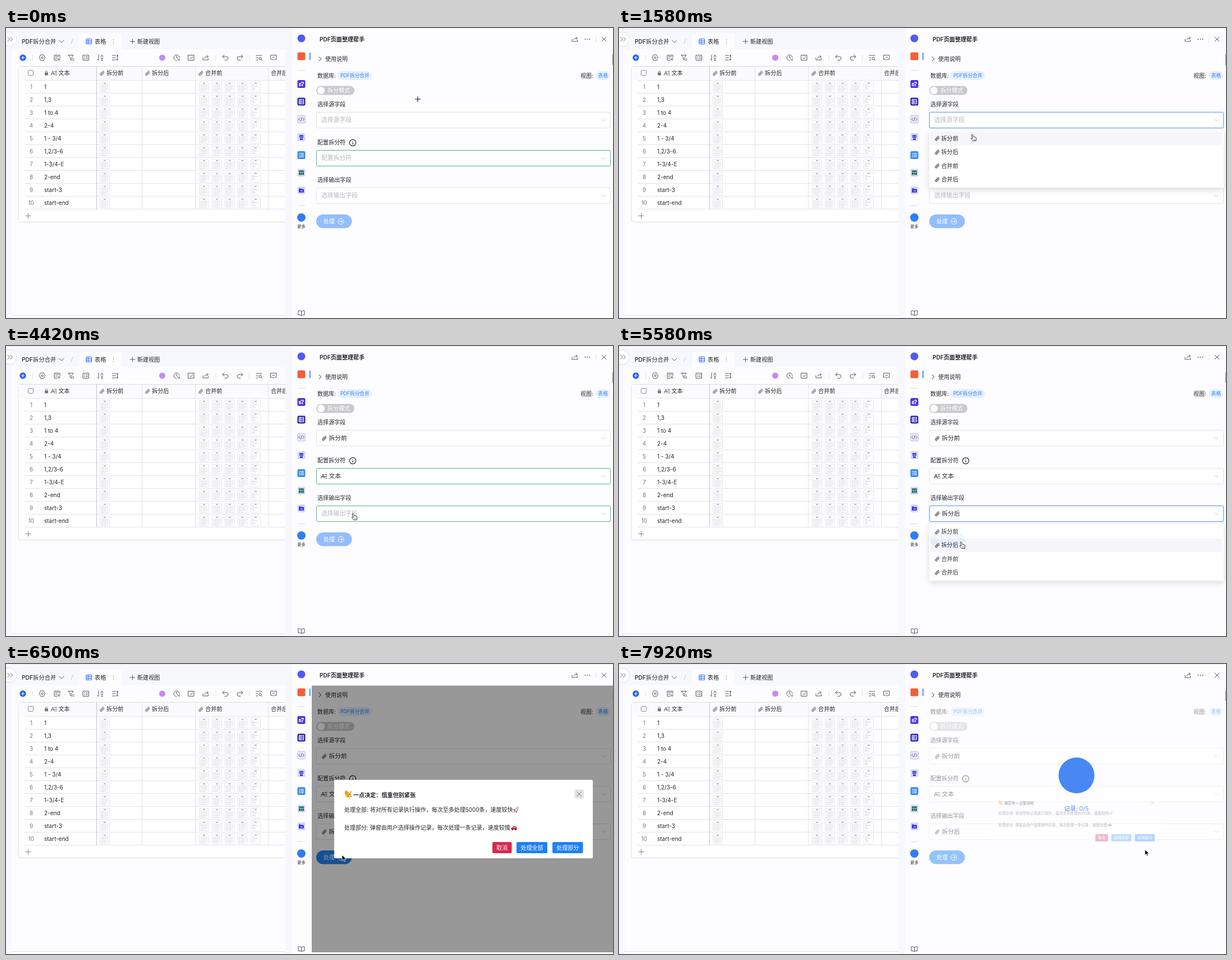
These frames come from a looping animation (1082x518 px, 8 s). An HTML page:

```html
<!DOCTYPE html>
<html lang="zh-CN">
<head>
<meta charset="utf-8">
<style>
html, body { margin: 0; width: 100%; height: 100%; overflow: hidden; background: #f7f8fe }
svg { display: block; width: 1082px; height: 518px; font-family: Inter, "Noto Sans CJK SC", sans-serif }
text { white-space: pre }
.pop { filter: drop-shadow(0 4px 6px #00000024) }
</style>
</head>
<body>
<svg viewBox="0 0 1082 518">
  <defs>
    <g id="doc">
      <rect x=".5" y=".5" width="17" height="17.5" rx="1" fill="#fff" stroke="#dcdde6" stroke-width=".8"/>
      <path d="M7 3h4" stroke="#777" stroke-width="1"/>
    </g>
    <g id="full">
      <use href="#doc"/>
      <path d="M2.5 6h13M2.5 8.5h13M2.5 11h13M2.5 13.5h13M2.5 16h9" stroke="#c4c4d4" stroke-width=".8" stroke-dasharray="3 .7 2 .5"/>
    </g>
    <g id="sparse">
      <use href="#doc"/>
      <path d="M2.5 6h4M2.5 8.5h10M2.5 11h4M2.5 13.5h6" stroke="#c4c4d4" stroke-width=".8"/>
    </g>
  </defs>
  <g id="still"></g>
  <g id="live"></g>
</svg>
<script>
const INK = '#25262c', GREY = '#55565e', BLUE = '#3370ff', PALE = '#d5d9fb', PAGE = '#fdfdff';
const $ = id => document.getElementById(id);
const clamp = v => Math.max(0, Math.min(1, v));

const text = (x, y, size, str, fill = INK, attrs = '') =>
  `<text x="${x}" y="${y + size * .37}" font-size="${size}" fill="${fill}" ${attrs}>${str}</text>`;
const rect = (x, y, w, h, fill, attrs = '') =>
  `<rect x="${x}" y="${y}" width="${w}" height="${h}" fill="${fill}" ${attrs}/>`;
const circle = (x, y, r, fill, attrs = '') => `<circle cx="${x}" cy="${y}" r="${r}" fill="${fill}" ${attrs}/>`;
const line = (d, stroke = GREY, w = 1, fill = 'none') =>
  `<path d="${d}" fill="${fill}" stroke="${stroke}" stroke-width="${w}" stroke-linecap="round" stroke-linejoin="round"/>`;
const at = (x, y, body) => `<g transform="translate(${x} ${y})">${body}</g>`;
const BOLD = 'font-weight="600"', MID = 'font-weight="500"', CENTER = 'text-anchor="middle"';

const clip = (x, y, c = GREY) => at(x, y,
  line('M4 -.5L0 3.8C-1.8 5.6 -4.6 3.2 -3 1.3L1 -3C2.3 -4.4 4.2 -2.6 3 -1.3L-.8 2.6C-1.5 3.2 -2.3 2.4 -1.7 1.7L1.6 -1.8', c, .9));
const letterIcon = (x, y, c = GREY) => at(x, y, line('M-5 3.5L-2 -3.5L.8 3.5M-4 1.2H0M1 -3.2H5M1.6 0H5M2.5 3.3H5', c, 1));
const plus = (x, y, r, c, w = 1) => line(`M${x - r} ${y}h${2 * r}M${x} ${y - r}v${2 * r}`, c, w);
const cross = (x, y, r, c) => line(`M${x - r} ${y - r}l${2 * r} ${2 * r}m0 ${-2 * r}l${-2 * r} ${2 * r}`, c);
const SHARE = 'M-5 0V4H4.5V1.5M-2 1Q-1.5 -2 4 -2M2 -4.5L4.5 -2L2 .5';

function toolbar() {
  const icons = [
    [64.5, 'M-2.5 -5H2.5L5 0L2.5 5H-2.5L-5 0ZM-1.7 0a1.7 1.7 0 1 0 3.4 0a1.7 1.7 0 1 0 -3.4 0'],
    [91, 'M5 0V-4.5H-5V4.5H0M-3 -2H3M-3 1H0M1.7 3a1.6 1.6 0 1 0 3.2 0a1.6 1.6 0 1 0 -3.2 0'],
    [116, 'M-5 -4.5H4L1 -.5V4.5L-1.5 3V-.5ZM3 2H5M3 4.5H5'],
    [142.5, 'M-5 -4.5H5V4.5H-5ZM-3 -1.5H-2M0 -1.5H3M-3 1.5H-2M0 1.5H3'],
    [168, 'M-3 -5V5L-5 3M1 -1L3 -5L5 -1M1.5 1H4.5L1.5 5H4.5'],
    [194.5, 'M-5 -4H1M-5 0H1M-5 4H1M4 -4.5V4.5M2.5 -3L4 -4.5L5.5 -3M2.5 3L4 4.5L5.5 3'],
    [304, 'M5 0A5 5 0 1 0 0 5M0 -3V0L2 1.5M2 3L5 5L5 2'],
    [330, 'M-5 -4.5H5V4.5H-5ZM-2.5 0L-.5 2L3 -2'],
    [356, SHARE],
    [391, 'M-2 -5L-5 -2L-2 1M-5 -2H2Q5 -2 5 1T2 4.5H-1'],
    [417, 'M2 -5L5 -2L2 1M5 -2H-2Q-5 -2 -5 1T-2 4.5H1'],
    [451, 'M-5 -4H5M-5 0H-2M-5 4H-2M0 1.5a2.2 2.2 0 1 0 4.4 0a2.2 2.2 0 1 0 -4.4 0M4 3.5L5.5 5'],
    [477, 'M-5 -4.5H5V3H1.5L0 4.5L-1.5 3H-5ZM-2 -.8H2']
  ];
  return circle(30, 53, 5.7, '#2463eb') + plus(30, 53, 2.6, '#fff', 1.2) + circle(278.5, 53, 5.5, '#c58af0') +
    [47.5, 374, 434].map(x => line(`M${x} 48v10`, '#dfe0e8')).join('') +
    icons.map(([x, d]) => at(x, 53, line(d))).join('');
}

function table() {
  const rows = ['1', '1,3', '1 to 4', '2-4', '1 - 3/4', '1,2/3-6', '1-3/4-E', '2-end', 'start-3', 'start-end'];
  const head = [[171, '拆分前'], [252, '拆分后'], [347, '合并前']];
  let s = `<path d="M510 68.5H26a4 4 0 0 0 -4 4V342.5a4 4 0 0 0 4 4H510" fill="#fff" stroke="#dadbe4"/>` +
    rect(22.5, 69, 476, 24, '#fbfbfe') + rect(39.5, 75.5, 9, 9, 'none', 'stroke="#888992" rx="1"') +
    rect(69, 79.5, 6, 5, '#777', 'rx="1"') + line('M70.3 79.5v-1a1.7 1.7 0 0 1 3.4 0v1', '#777') +
    letterIcon(85.5, 80.5) + text(93.5, 80.5, 10.1, '文本') + text(472, 80.5, 10, '合并后');
  for (const [x, name] of head) s += clip(x, 80.5) + text(x + 8, 80.5, 10.2, name);
  for (let i = 0; i <= 10; i++) s += line(`M34 ${93.5 + 23 * i}H498`, '#e1e2ea');
  for (const x of [161.5, 242.5, 337.5, 467.5]) s += line(`M${x} 69V323`, x < 200 ? '#c2c3cc' : '#e1e2ea');
  rows.forEach((name, i) => {
    const y = 105 + 23 * i;
    s += text(45, y, 10, i + 1, '#777881', CENTER) + text(68, y, 10, name);
    [167, 344, 367, 389.5, 412.5, 436].forEach((x, k) =>
      s += `<use href="#${k == 5 ? 'sparse' : 'full'}" x="${x}" y="${y - 9}"/>`);
  });
  return s + plus(39.5, 335.5, 4.5, '#85868f');
}

function sidebar() {
  const tile = (y, fill, glyph = '', attrs = '') => at(526.5, y, rect(-7, -7, 14, 14, fill, 'rx="2.5" ' + attrs) + glyph);
  const grid = c => rect(-4, -4, 8, 8, 'none', `stroke="${c}"`) + line('M-4 -1.3H4M-4 1.4H4M-1.3 -4V4', c);
  return circle(526.5, 18.5, 7, '#4e5cf2') + tile(50.5, '#f2603a') + rect(541, 44, 1.6, 13, BLUE) +
    line('M520 75.5h13M520 317.5h13', '#d8d9e2') +
    tile(100, '#4a2fe6', line('M-3.5 3.5V-1H-1M-1 3.5V1M2 3.5V0M0 -3H3.5V-1', '#fff', 1.5)) +
    tile(131.5, '#2b23b5', grid('#fff')) +
    tile(163, '#e6e7fa', line('M-2.5 -2.5L-5 0L-2.5 2.5M2.5 -2.5L5 0L2.5 2.5M1 -3L-1 3', '#5d6090'), 'stroke="#b4b6dd" stroke-width=".8"') +
    tile(195, PALE, rect(-3.5, -4, 7, 5, '#4038e0', 'rx="1"') + rect(-2.5, 2, 5, 3, '#4038e0') + circle(-1.5, -1.5, .8, '#fff') + circle(1.5, -1.5, .8, '#fff')) +
    tile(227, '#368bf4', line('M-4 -3H4M-4 0H-1M-4 3H4', '#fff', 1.2) + circle(2, 0, 1.7, '#368bf4', 'stroke="#fff"')) +
    tile(258.5, PALE, rect(-4.5, -4, 9, 8, '#14685a') + line('M-4 -1H4M-1.5 -1V4M1.5 -1V4', '#cfe5e5', .8)) +
    tile(290, PALE, line('M-4 3V-3H-1L0 -2H4V3Z', '#4038e0', 1, '#4038e0') + line('M-1 1H2', '#fff')) +
    circle(526.5, 338.5, 7.5, '#2f7df6') + text(526.5, 354, 7.3, '更多', INK, CENTER) +
    at(526.5, 509, line('M0 -3Q-2 -4.5 -5.5 -4V3.5Q-2 3 0 4.5Q2 3 5.5 3.5V-4Q2 -4.5 0 -3V4.5'));
}

function still() {
  return rect(10, 38, 488, 480, PAGE) +
    `<path d="M126 38Q131 38 131 33V14Q131 10 135 10H202Q206 10 206 14V33Q206 38 211 38" fill="${PAGE}"/>` +
    circle(6, 20, 13, '#fff', 'stroke="#dcdde6"') + line('M3 16.5l3.5 3.5l-3.5 3.5M8 16.5l3.5 3.5l-3.5 3.5', '#62636c') +
    text(28, 24, 10.3, 'PDF拆分合并', INK, MID) + line('M94.5 22l4.3 4.3l4.3 -4.3', GREY) + line('M116 28l3 -8', '#c4c5ce') +
    rect(143, 19.5, 9.5, 9, 'none', `stroke="${BLUE}" stroke-width="1.2" rx="1"`) + line('M143 22.5h9.5M143 25.5h9.5M146.5 20v8', BLUE) +
    text(158, 24, 10.2, '表格', INK, MID) + [20.5, 24, 27.5].map(y => circle(191.5, y, .7, '#888')).join('') +
    plus(225.5, 24, 4.3, GREY) + text(234, 24, 10.1, '新建视图') + toolbar() + table() +
    line('M10 513.5H498', '#dfe0ea') +
    rect(498, 0, 12, 518, '#f7f8fe') + rect(510, 0, 572, 518, PAGE) + rect(0, 0, 1082, 1, '#ececf5') + sidebar() +
    text(559, 20, 10.1, 'PDF页面整理帮手', INK, BOLD) + at(1014, 20, line(SHARE)) +
    [1032.5, 1036.5, 1040.5].map(x => circle(x, 20, .9, GREY)).join('') +
    line('M1052 15v10', '#dfe0e8') + cross(1066, 20, 4, GREY);
}

const FIELDS = [
  { y: 150.5, label: '选择源字段', value: '拆分前', set: 2060, open: 960, focus: [900, 2900], hover: [[300, 900]] },
  { y: 218.5, label: '配置拆分符', value: '文本', set: 3720, open: 2960, focus: [2900, 4240], hover: [[0, 50], [2600, 2900], [4240, 4560]] },
  { y: 285.5, label: '选择输出字段', value: '拆分后', set: 5570, open: 4600, focus: [4560, 6240], hover: [[4200, 4560]] }
];
const ATTACH = ['拆分前', '拆分后', '合并前', '合并后'];
const within = (t, [a, b]) => t >= a && t < b;

function field(f, i, t) {
  const focused = within(t, f.focus), hovered = f.hover.some(r => within(t, r));
  const edge = focused ? '#6a9df8' : hovered ? '#54b283' : '#e1e2ea';
  const y = f.y + 14, done = t >= f.set;
  let s = text(555, f.y - 14, 10.1, f.label) +
    (focused ? rect(553.5, f.y, 524, 28, 'none', 'rx="2" stroke="#dbe7fd" stroke-width="2.6"') : '') +
    rect(553.5, f.y, 524, 28, '#fff', `rx="2" stroke="${edge}"`) +
    line(`M1061.5 ${y - 1.5}l3.5 3.5l3.5 -3.5`, '#c6c7d0');
  if (done) s += (i == 1 ? letterIcon : clip)(567, y, INK) + text(575.5, y, 10.7, f.value);
  else s += text(562, y, 10.8, f.label, '#b7b8c0') + (i == 1 && focused && t < 3400 ? line(`M562 ${y - 6}v12`, '#6b8fd8') : '');
  return s;
}

function menu(f, i, t, my) {
  const show = Math.min(clamp((t - f.open) / 200), clamp(1 - (t - f.set) / 200));
  if (!show) return '';
  const items = i == 1 ? ['文本'] : ATTACH, top = f.y + 32;
  let s = rect(553, top, 525, items.length * 24.5 + 5, '#fff', 'rx="2" class="pop"');
  items.forEach((name, k) => {
    const y = top + 14.3 + k * 24.5;
    if (Math.abs(my - y) < 12.2) s += rect(555, y - 12, 520, 24.5, '#f5f5fb');
    s += (i == 1 ? letterIcon : clip)(567, y, INK) + text(574.5, y, 10.1, name);
  });
  return `<g opacity="${show}" transform="translate(0 ${top * (1 - show) * .2}) scale(1 ${.8 + .2 * show})">${s}</g>`;
}

function form(t, my) {
  const ready = t >= FIELDS[2].set;
  return line('M558 51.5l3.7 3.7l-3.7 3.7', INK) + text(569, 55.5, 10, '使用说明') +
    text(555, 85, 10, '数据库:') + rect(591, 77, 61, 16, '#e6f0ff', 'rx="8"') + text(596, 85, 8.7, 'PDF拆分合并', '#3580f5') +
    text(1024, 85, 10, '视图:') + rect(1051, 77, 26, 16, '#e6f0ff', 'rx="8"') + text(1055.5, 85, 8.7, '表格', '#3580f5') +
    rect(553, 103.5, 68, 16, '#c8c9cd', 'rx="8"') + circle(561.5, 111.5, 6.6, '#fff') + text(573, 111.5, 10.1, '拆分模式', '#fff') +
    FIELDS.map((f, i) => field(f, i, t)).join('') +
    circle(618, 205, 5.6, 'none', `stroke="${INK}" stroke-width="1.2"`) + line('M618 204.5v3M618 202.3v.1', INK, 1.2) +
    rect(553, 333, 63.5, 24.5, ready ? '#2185f8' : '#94bdfb', 'rx="12.25"') + text(566, 345.5, 10, '处理', '#fff', MID) +
    circle(597, 345.5, 5, 'none', 'stroke="#fff"') + line('M594.5 345.5h5M597.5 343.5l2 2l-2 2', '#fff') +
    FIELDS.map((f, i) => menu(f, i, t, my)).join('');
}

const party = at(609.5, 232.5, circle(.5, 1, 5.5, '#fbc43c') + line('M-5.5 -1L-4 -6.5L0 -3.5Z', '#d9822b', .8, '#ef9a3a') +
  line('M-2 0h1.5M2 0h1.5M-1 3q1.5 1.5 3 0', '#6b4214') + circle(5.5, -4, .9, '#e0455c') + circle(5.5, 4, .9, '#4a8be0'));
const rocket = at(909.5, 260, line('M-3 3Q-3 -3 4 -4.5Q3.5 2 -1.5 4Z', '#7d8190', .8, '#d5d8e2') +
  line('M-4.5 4.5l2 -2', '#ef7d2b', 1.5) + line('M-3 0L-5 1M1 3.5L0 5', '#d3323f', 1.5));
const car = at(905.5, 293, line('M-5 2V0L-2.5 -.5L-1 -3H3L5 0V2Z', '#cf2f3b', .8, '#e0404a') +
  line('M0 -1.5h2.5', '#cfe3f5') + circle(-2.5, 2.5, 1.4, '#333') + circle(3, 2.5, 1.4, '#333'));

function dialog(show, closing, mx) {
  const button = (x, w, name, fill) => rect(x, 318, w, 20, fill, 'rx="2"') + text(x + w / 2, 328, 10, name, '#fff', `${CENTER} ${MID}`);
  const k = .5 + .5 * show;
  return `<g opacity="${show}" transform="translate(815.5 277) scale(${k}) translate(-815.5 -277)">` +
    rect(585, 207, 461, 140, '#fff', 'rx="2"') + party +
    text(619, 234, 10.1, closing ? '确实有一点繁琐呢' : '一点决定：慎重但别紧张', INK, BOLD) +
    (show == 1 ? rect(1013.5, 224, 16.5, 16.5, '#e4e4e6', 'rx="2"') : '') + cross(1021.7, 232.3, 4, '#666') +
    text(603, 260.5, 10, '处理全部: 将对所有记录执行操作，每次至多处理5000条，速度较快') + rocket +
    text(603, 292.5, 10, '处理部分: 弹窗由用户选择操作记录，每次处理一条记录，速度较慢') + car +
    button(867, 34.5, '取消', '#d52950') + button(910, 55, '处理全部', mx > 915 ? '#469cf9' : '#1f80f3') +
    button(974, 54.5, '处理部分', '#1f80f3') + '</g>';
}

// Pointer stops: time, x, y
const PATH = [[0, 734, 127], [80, 734, 127], [750, 640, 166], [1000, 640, 166], [1450, 632, 196], [2080, 632, 196],
  [2700, 638, 232], [3100, 638, 232], [3500, 626, 264], [3750, 626, 264], [4300, 621, 305], [4660, 621, 305],
  [5250, 612, 356], [5600, 612, 356], [6080, 592, 347], [6420, 592, 347], [7330, 938, 337], [8000, 938, 337]];

function pointerAt(t) {
  const i = PATH.findIndex(p => p[0] > t), [a, b] = [PATH[i - 1], PATH[i]];
  const p = (t - a[0]) / (b[0] - a[0]), e = p * p * (3 - 2 * p);
  return [a[1] + (b[1] - a[1]) * e, a[2] + (b[2] - a[2]) * e];
}

function pointer(x, y, t) {
  if (t < 330) return plus(x, y, 4.5, '#fff', 3) + plus(x, y, 4.5, '#111', 1.1);
  const arrow = t >= 6240 && (x < 910 || t > 7900);
  if (arrow) return at(x - .5, y - 5.5, line('M0 0v10l2.3 -2.2l1.7 3.8l1.7 -.8l-1.7 -3.6h3.2z', '#fff', .8, '#000'));
  return at(x, y, line('M-3.6 -5.3C-3 -6.4 -1.6 -6 -1.3 -4.9L-.4 -1.8L3.4 -1Q5 -.6 4.9 1L4.3 5.6H-1.2L-4.7 1.6Q-4.6 .2 -3 .6L-2 1.2Z', '#222', .9, '#fff') +
    line('M.6 2v2M2.4 2v2', '#444', .6));
}

function live(t) {
  const [x, y] = pointerAt(t);
  const show = Math.min(clamp((t - 6245) / 220), clamp(1 - (t - 7765) / 220));
  const loading = t > 7900;
  let s = form(t, y);
  if (loading) s += rect(545, 70, 537, 445, PAGE, 'opacity=".52"') + text(815.5, 258, 10.3, '记录: 0/5', '#4a8cf6', `${CENTER} ${BOLD}`);
  else if (show) s += rect(545, 38.5, 537, 476.5, '#000', `opacity="${.4 * show}"`);
  if (show) s += dialog(show, loading, x);
  if (loading) s += circle(815.5, 199, 32, '#4788f5');
  return s + rect(1081, 47, 1, 19, '#85868e') + pointer(x, y, t);
}

$('still').innerHTML = still();
let last = -1;
function tick(now) {
  const step = Math.floor((now % 8000 + 5) / (1000 / 12)) % 96;
  if (step != last) $('live').innerHTML = live((last = step) * 1000 / 12);
  requestAnimationFrame(tick);
}
tick(performance.now());
</script>
</body>
</html>
```
